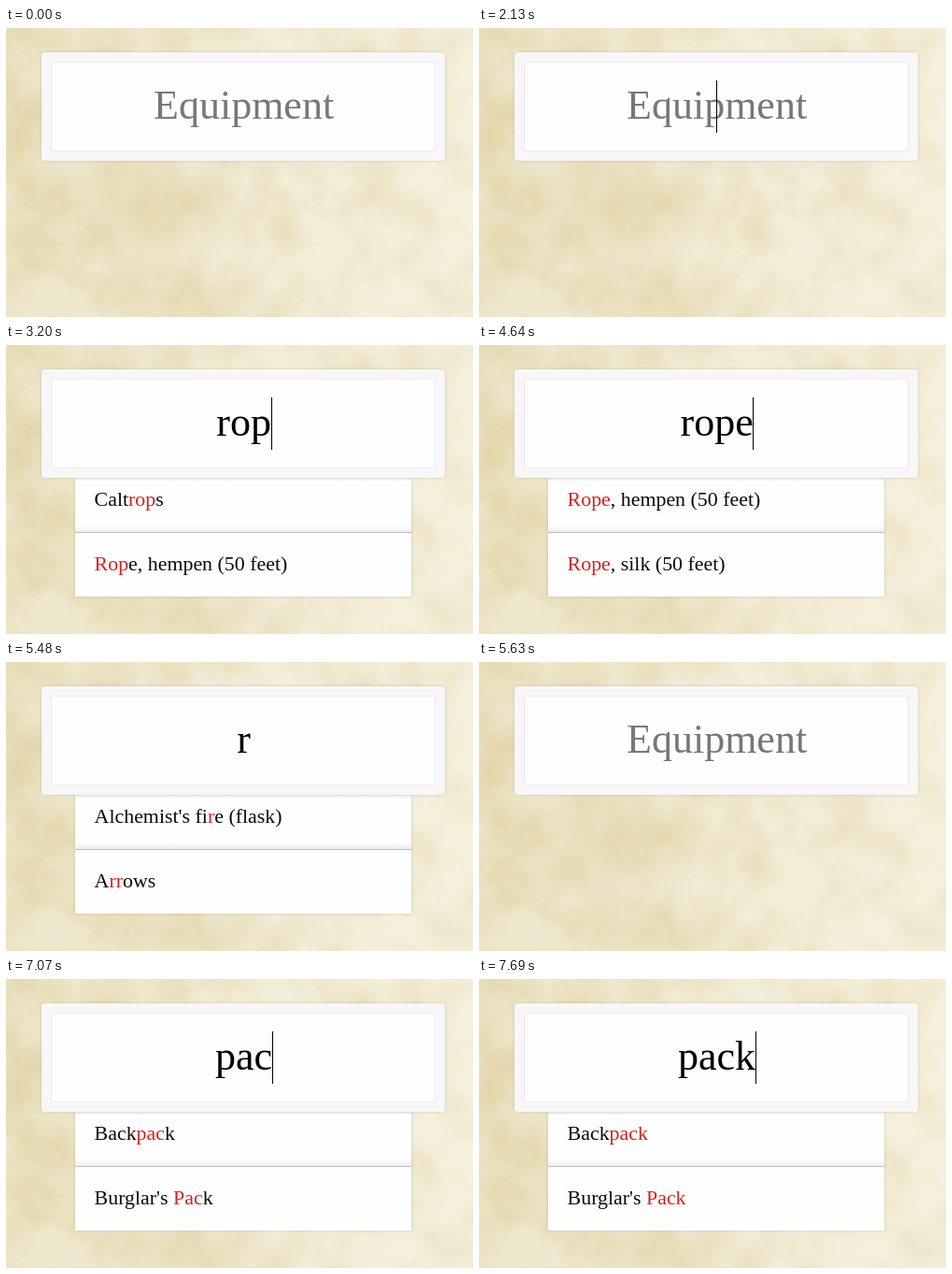
An HTML page for the animation above (8000 ms loop, 500 by 309 pixels).

```html
<!DOCTYPE html>
<html lang="en">
<head>
<meta charset="utf-8">
<title>Equipment search</title>
<style>
  html, body { margin: 0; width: 100%; height: 100%; overflow: hidden; background: #f2ebd3; }
  svg { display: block; width: 500px; height: 309px; }
  text { font-family: "Liberation Serif", "Times New Roman", serif; white-space: pre; }
  #field { font-size: 44px; text-anchor: middle; }
  .row { font-size: 21.9px; fill: #0c0808; }
</style>
</head>
<body>
<svg viewBox="0 0 500 309">
  <defs>
    <linearGradient id="paper">
      <stop offset="0" stop-color="#eee6ca"/>
      <stop offset=".45" stop-color="#f2ebd4"/>
      <stop offset="1" stop-color="#f6f0de"/>
    </linearGradient>
    <radialGradient id="stain">
      <stop offset="0" stop-color="#d5c48c" stop-opacity=".34"/>
      <stop offset="1" stop-color="#d5c48c" stop-opacity="0"/>
    </radialGradient>
    <linearGradient id="fade">
      <stop offset="0" stop-color="#fff"/>
      <stop offset="1" stop-color="#777"/>
    </linearGradient>
    <mask id="grainMask"><rect width="500" height="309" fill="url(#fade)"/></mask>
    <filter id="grain" x="0" y="0" width="1" height="1" color-interpolation-filters="sRGB">
      <feTurbulence type="fractalNoise" baseFrequency=".019" numOctaves="5" seed="7"/>
      <feColorMatrix values="0 0 0 0 .84  0 0 0 0 .77  0 0 0 0 .54  1.1 0 0 0 -.42"/>
    </filter>
    <filter id="soft" x="-5%" y="-10%" width="110%" height="120%">
      <feDropShadow dx="0" dy="0" stdDeviation="1.6" flood-color="#6b6040" flood-opacity=".28"/>
    </filter>
    <linearGradient id="under" x2="0" y2="1">
      <stop offset="0" stop-color="#000" stop-opacity=".07"/>
      <stop offset="1" stop-color="#000" stop-opacity="0"/>
    </linearGradient>
    <linearGradient id="above" x2="0" y2="1">
      <stop offset="0" stop-color="#000" stop-opacity="0"/>
      <stop offset="1" stop-color="#000" stop-opacity=".07"/>
    </linearGradient>
  </defs>

  <rect width="500" height="309" fill="url(#paper)"/>
  <ellipse cx="140" cy="195" rx="130" ry="80" fill="url(#stain)"/>
  <ellipse cx="185" cy="285" rx="95" ry="50" fill="url(#stain)" opacity=".6"/>
  <ellipse cx="0" cy="100" rx="60" ry="120" fill="url(#stain)" opacity=".5"/>
  <g mask="url(#grainMask)"><rect width="500" height="309" filter="url(#grain)"/></g>

  <g id="list">
    <rect x="74" y="130" width="360" height="139" fill="#fefefe" filter="url(#soft)"/>
    <rect x="74" y="142" width="360" height="4" fill="url(#under)"/>
    <rect x="74" y="193" width="360" height="7" fill="url(#above)"/>
    <rect x="74" y="200" width="360" height="1" fill="#bfbfbf"/>
    <text class="row" x="94.6" y="172"></text>
    <text class="row" x="94.6" y="241"></text>
  </g>

  <rect x="38" y="26" width="432" height="116" rx="4" fill="#f7f7f7" filter="url(#soft)"/>
  <rect x="48.5" y="36.5" width="411" height="95" fill="#fefefe" stroke="#ececec"/>
  <text id="field" x="254.6" y="97"></text>
  <rect id="caret" y="56" width="1" height="56"/>
</svg>
<script>
const LOOP = 8000;
const RED = '#d9201f', DULL_RED = '#923c38';

// start in ms, typed text, caret visible
const steps = [
  [0, '', false], [1090, '', true], [1610, '', false], [2130, '', true],
  [2390, 'r', true], [2770, 'ro', true], [3200, 'rop', true],
  [3610, 'rope', true], [4130, 'rope', false], [4640, 'rope', true],
  [5180, 'rop', false], [5330, 'ro', false], [5480, 'r', false], [5630, '', false],
  [5710, '', true], [6220, '', false],
  [6320, 'p', true], [6610, 'pa', true], [7070, 'pac', true],
  [7590, 'pac', false], [7690, 'pack', true]
];

const matches = {
  r: ["Alchemist's fire (flask)", 'Arrows'],
  ro: ['Arrows', 'Bedroll'],
  rop: ['Caltrops', 'Rope, hempen (50 feet)'],
  rope: ['Rope, hempen (50 feet)', 'Rope, silk (50 feet)'],
  p: ["Alchemist's supplies", 'Backpack'],
  pa: ['Backpack', 'Barding: Padded'],
  pac: ['Backpack', "Burglar's Pack"],
  pack: ['Backpack', "Burglar's Pack"]
};

const field = document.getElementById('field');
const caret = document.getElementById('caret');
const list = document.getElementById('list');
const rows = document.querySelectorAll('.row');

function highlight(row, label, query) {
  const color = query === 'p' ? DULL_RED : RED;
  const parts = label.split(new RegExp(`(${query})`, 'i'));
  row.replaceChildren(...parts.map((part, i) => {
    const span = document.createElementNS('http://www.w3.org/2000/svg', 'tspan');
    span.textContent = part;
    if (i % 2) span.setAttribute('fill', color);
    return span;
  }));
}

function show([, query, caretOn]) {
  field.textContent = query || 'Equipment';
  field.setAttribute('fill', query ? '#000' : '#787774');
  const width = query ? field.getComputedTextLength() : 0;
  caret.setAttribute('x', Math.round(254.3 + width / 2));
  caret.setAttribute('visibility', caretOn ? 'visible' : 'hidden');
  list.setAttribute('visibility', query ? 'visible' : 'hidden');
  if (query) rows.forEach((row, i) => highlight(row, matches[query][i], query));
}

let current;
const start = performance.now();
function tick() {
  const time = (performance.now() - start) % LOOP;
  const step = steps.findLast(([at]) => at <= time);
  if (step !== current) show(current = step);
  requestAnimationFrame(tick);
}
tick();
</script>
</body>
</html>
```
